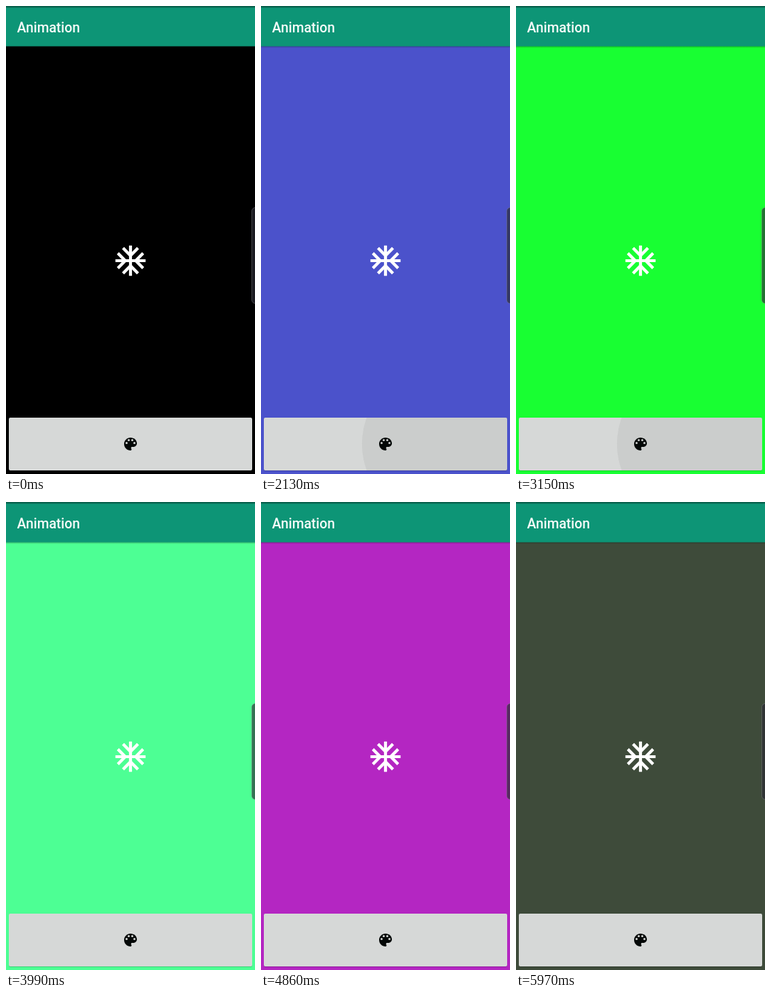
An HTML page with a canvas for the animation above (6000 ms loop, 350 by 656 pixels).

```html
<!DOCTYPE html>
<html lang="en">
<head>
<meta charset="utf-8">
<title>Animation</title>
<style>
  html, body { margin: 0; width: 100%; height: 100%; overflow: hidden; background: #000; }
  canvas { display: block; width: 350px; height: 656px; }
</style>
</head>
<body>
<canvas id="stage"></canvas>
<script>
const W = 350, H = 656, LOOP = 6000;
const canvas = document.getElementById('stage');
const ctx = canvas.getContext('2d');
const dpr = window.devicePixelRatio || 1;
canvas.width = W * dpr;
canvas.height = H * dpr;

const START_COLOR = [0, 0, 0];
const TAPS = [
  { at: 1080, color: [75, 82, 203] },
  { at: 2130, color: [24, 255, 50] },
  { at: 3150, color: [77, 255, 148] },
  { at: 4080, color: [180, 38, 194] },
  { at: 5130, color: [62, 75, 58] }
];
const FADE_DELAY = 60, FADE_TIME = 600;
const BUTTON = { x: 4, y: 577, w: 342, h: 74 };
const RIPPLE = { lead: 30, grow: 225, exit: 150, x: 253, y: 614, from: 103, to: 175, alpha: 0.12 };

const clamp = v => Math.min(1, Math.max(0, v));
const mix = (a, b, f) => a + (b - a) * f;
const easeInOut = x => (1 - Math.cos(Math.PI * x)) / 2;

// cubic-bezier(0.4, 0, 0.2, 1)
function fastOutSlowIn(x) {
  let lo = 0, hi = 1;
  for (let i = 0; i < 20; i++) {
    const s = (lo + hi) / 2, r = 1 - s;
    if (1.2 * r * r * s + 0.6 * r * s * s + s ** 3 < x) lo = s; else hi = s;
  }
  return lo * lo * (3 - 2 * lo);
}

// Blends in linear light.
const blend = (a, b, f) => a.map((v, i) =>
  Math.round(mix(v ** 2.2, b[i] ** 2.2, f) ** (1 / 2.2)));

function backgroundAt(t) {
  return TAPS.reduce((color, tap) => {
    const f = easeInOut(clamp((t - tap.at - FADE_DELAY) / FADE_TIME));
    return f > 0 ? blend(color, tap.color, f) : color;
  }, START_COLOR);
}

const snowflake = new Path2D('M22 11h-4.17l3.24-3.24-1.41-1.42L15 11h-2V9l4.66-4.66-1.42-1.41L13 6.17V2h-2v4.17L7.76 2.93 6.34 4.34 11 9v2H9L4.34 6.34 2.93 7.76 6.17 11H2v2h4.17l-3.24 3.24 1.41 1.42L9 13h2v2l-4.66 4.66 1.42 1.41L11 17.83V22h2v-4.17l3.24 3.24 1.42-1.41L13 15v-2h2l4.66 4.66 1.41-1.42L17.83 13H22z');

const palette = new Path2D('M12 3c-4.97 0-9 4.03-9 9s4.03 9 9 9c.83 0 1.5-.67 1.5-1.5 0-.39-.15-.74-.39-1.01-.23-.26-.38-.61-.38-.99 0-.83.67-1.5 1.5-1.5H16c2.76 0 5-2.24 5-5 0-4.42-4.03-8-9-8z');
for (const [x, y] of [[6.5, 10.5], [9.5, 6.5], [14.5, 6.5], [17.5, 10.5]]) {
  palette.moveTo(x + 1.5, y);
  palette.arc(x, y, 1.5, 0, Math.PI * 2);
}

function roundRect(x, y, w, h, r) {
  ctx.beginPath();
  ctx.moveTo(x + r, y);
  ctx.arcTo(x + w, y, x + w, y + h, r);
  ctx.arcTo(x + w, y + h, x, y + h, r);
  ctx.arcTo(x, y + h, x, y, r);
  ctx.arcTo(x, y, x + w, y, r);
  ctx.closePath();
}

// Icons live on a 24-unit grid, placed by their centre.
function drawIcon(path, x, y, scale, color) {
  ctx.save();
  ctx.translate(x, y);
  ctx.scale(scale, scale);
  ctx.translate(-12, -12);
  ctx.fillStyle = color;
  ctx.fill(path, 'evenodd');
  ctx.restore();
}

function drawHeader() {
  const shadow = ctx.createLinearGradient(0, 56, 0, 59);
  shadow.addColorStop(0, 'rgba(0,0,0,0.3)');
  shadow.addColorStop(1, 'rgba(0,0,0,0)');
  ctx.fillStyle = shadow;
  ctx.fillRect(0, 56, W, 3);
  ctx.fillStyle = '#0d9576';
  ctx.fillRect(0, 0, W, 56.5);
  ctx.fillStyle = '#08624e';
  ctx.fillRect(0, 0, W, 2.3);
  ctx.fillStyle = '#f6fbf9';
  ctx.font = '500 19.3px Roboto, sans-serif';
  ctx.fillText('Animation', 15.6, 37);
}

function drawHandle() {
  roundRect(345.5, 282.5, 20, 134.5, 5);
  ctx.fillStyle = 'rgba(42,41,50,0.66)';
  ctx.fill();
  ctx.strokeStyle = 'rgba(130,130,135,0.45)';
  ctx.lineWidth = 1;
  ctx.stroke();
}

function drawRipple(t) {
  for (const tap of TAPS) {
    const age = t - tap.at + RIPPLE.lead;
    const alpha = RIPPLE.alpha * clamp(age / 75) * (1 - clamp((age - RIPPLE.grow) / RIPPLE.exit));
    if (alpha <= 0) continue;
    const f = fastOutSlowIn(clamp(age / RIPPLE.grow));
    ctx.beginPath();
    ctx.arc(mix(RIPPLE.x, W / 2, f), RIPPLE.y, mix(RIPPLE.from, RIPPLE.to, f), 0, Math.PI * 2);
    ctx.fillStyle = `rgba(0,0,0,${alpha})`;
    ctx.fill();
  }
}

function drawButton(t) {
  const { x, y, w, h } = BUTTON;
  ctx.fillStyle = 'rgba(0,0,0,0.18)';
  roundRect(x, y + 1, w, h, 2);
  ctx.fill();
  ctx.save();
  roundRect(x, y, w, h, 2);
  ctx.fillStyle = '#d6d8d7';
  ctx.fill();
  ctx.clip();
  drawRipple(t);
  ctx.restore();
  drawIcon(palette, 175, 614, 1, '#040807');
}

function draw(t) {
  ctx.setTransform(dpr, 0, 0, dpr, 0, 0);
  ctx.fillStyle = `rgb(${backgroundAt(t)})`;
  ctx.fillRect(0, 0, W, H);
  drawHeader();
  drawIcon(snowflake, 175, 357, 2.12, '#fff');
  drawHandle();
  drawButton(t);
}

const start = performance.now();
function tick() {
  draw((performance.now() - start) % LOOP);
  requestAnimationFrame(tick);
}
tick();
</script>
</body>
</html>
```
